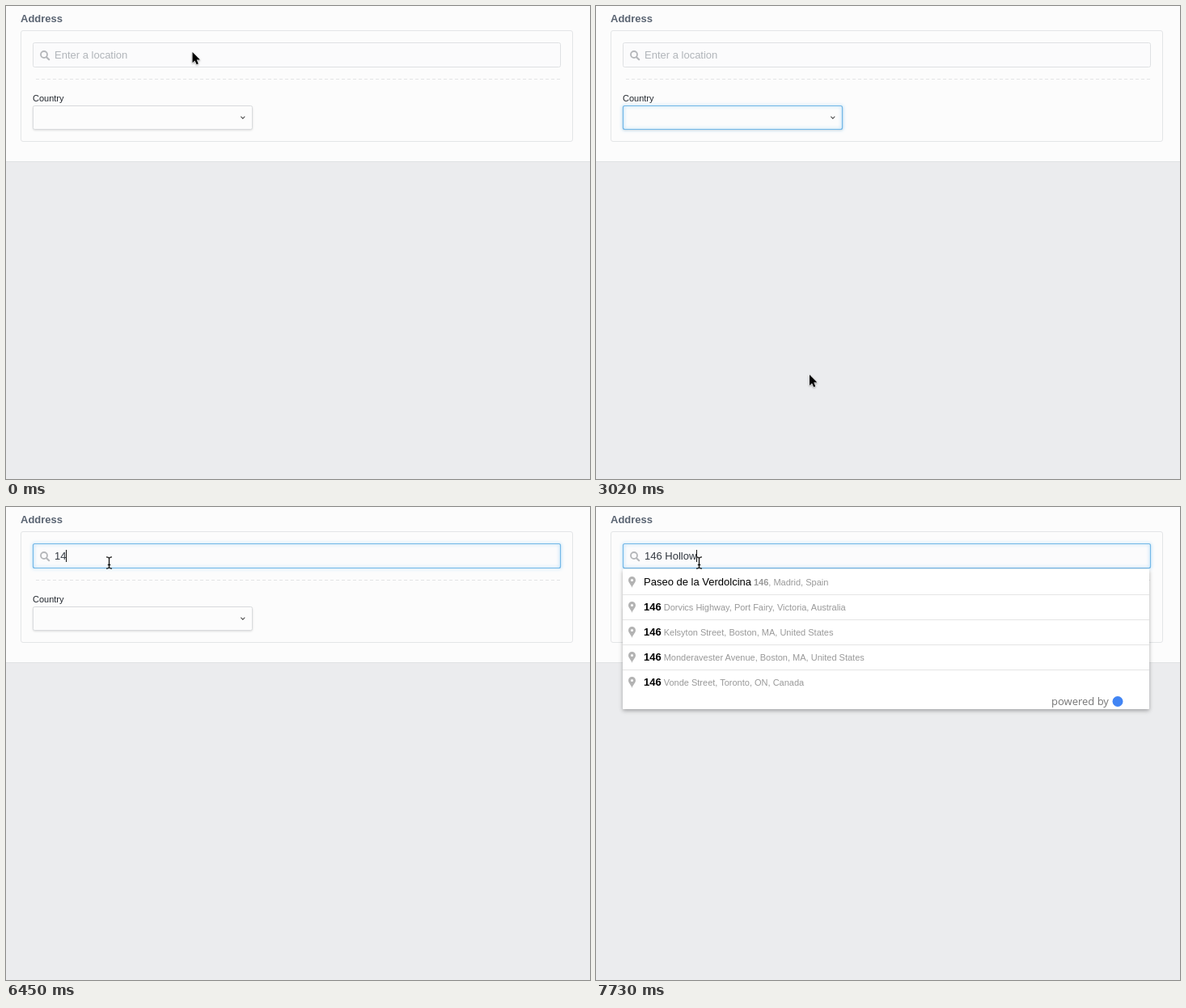
An HTML page that plays this animation: 722 px wide and 585 px high, repeating every 8000 ms.

```html
<!DOCTYPE html>
<html lang="en">
<head>
<meta charset="utf-8">
<title>Address lookup</title>
<style>
  html, body { margin: 0; width: 100%; height: 100%; overflow: hidden; background: #ebecee; }
  svg { display: block; font: 13px "Liberation Sans", Arial, sans-serif; }
  .small { font-size: 11px; }
  .sub { font-size: 11px; fill: #999; }
  .bold { font-weight: 700; }
  .focus { fill: none; stroke: #73b8e8; stroke-width: 1.2; filter: drop-shadow(0 0 2px #7cc4f5); }
  #menu { filter: drop-shadow(0 2px 2.5px rgba(0, 0, 0, .32)); }
  #select { filter: drop-shadow(0 1px 1px rgba(0, 0, 0, .12)); }
  #arrow { filter: drop-shadow(0 1px 1px rgba(0, 0, 0, .35)); }
</style>
</head>
<body>
<svg width="722" height="585" viewBox="0 0 722 585">
  <defs>
    <path id="pin" fill="#b3b3b3" fill-rule="evenodd"
      d="M4.5 14C4 10.5 0 8 0 4.5a4.5 4.5 0 0 1 9 0C9 8 5 10.5 4.5 14ZM4.5 2.9a1.6 1.6 0 1 0 0 3.2a1.6 1.6 0 1 0 0-3.2Z"/>
  </defs>
  <rect width="722" height="585" fill="#ebecee"/>
  <rect width="722" height="192" fill="#fcfcfc"/>
  <path d="M0 192.5H722" stroke="#e0e2e4"/>
  <text class="bold" x="18" y="20" fill="#5a6472">Address</text>
  <rect x="18.5" y="30.5" width="682" height="137" rx="2.5" fill="none" stroke="#e3e5e7"/>
  <path d="M37 90.5H686" stroke="#e3e4e5" stroke-dasharray="4 3"/>

  <rect x="33.5" y="45.5" width="652" height="30" rx="2" fill="#fbfbfc" stroke="#dfe1e3"/>
  <rect id="inputFocus" class="focus" x="33.5" y="45.5" width="652" height="30" rx="2"/>
  <g fill="none" stroke="#b5b7ba">
    <circle cx="47" cy="60" r="4" stroke-width="1.8"/>
    <path d="M50 63.2L53.2 66.2" stroke-width="2.2" stroke-linecap="round"/>
  </g>
  <text id="entry" x="60" y="65"></text>
  <rect id="caret" y="53" width="1" height="15" fill="#111"/>

  <text class="small" x="33" y="118" fill="#22272e">Country</text>
  <rect id="select" x="33.5" y="123.5" width="271" height="29" rx="2" fill="#fcfcfc" stroke="#d9dbdd"/>
  <rect id="selectFocus" class="focus" x="33.5" y="123.5" width="271" height="29" rx="2"/>
  <path d="M290.3 136.7L292.8 139.2L295.3 136.7" fill="none" stroke="#555" stroke-width="1.1"/>

  <g id="menu">
    <rect x="33" y="77" width="651" height="173" rx="1" fill="#fff"/>
    <g id="rows"></g>
    <text x="563" y="245" fill="#757575" font-family="Open Sans, sans-serif">powered by</text>
    <circle cx="645" cy="240.5" r="6.5" fill="#4285f4"/>
  </g>

  <path id="arrow" stroke="#fff" stroke-width="1" paint-order="stroke"
    d="M1 0V13.2L4 10.4L6.2 15.2L8.3 14.2L6.2 9.6H10.4Z"/>
  <g id="beam" fill="none">
    <path stroke="#fff" stroke-width="2.6" opacity=".8" d="M0-6V6"/>
    <path stroke="#111" stroke-width="1.3" d="M-3.5-7.2Q-.6-7.2 0-5.5Q.6-7.2 3.5-7.2M0-5.5V5.5M-3.5 7.2Q-.6 7.2 0 5.5Q.6 7.2 3.5 7.2M-1.7 2.5H1.7"/>
  </g>
</svg>
<script>
const LOOP = 8000;
const $ = id => document.getElementById(id);

// Every track is a list of [start time, value]; each value holds until the next.
const selectGlow = [[0, 0], [190, .5], [290, 1], [3700, .5], [3760, 0]];
const inputGlow = [[0, 0], [3700, .5], [3760, 1]];
const caretShown = [[0, 0], [3760, 1], [4240, 0], [4720, 1], [5200, 0], [5740, 1]];
const typed = [
  [0, ""], [6150, "1"], [6450, "14"], [6800, "146"], [6920, "146 "], [7210, "146 H"],
  [7320, "146 Ho"], [7380, "146 Hol"], [7560, "146 Holl"], [7650, "146 Hollo"], [7730, "146 Hollow"]
];
const pointer = [
  [0, [229.5, 57]], [1130, [231.5, 56]], [1185, [226, 74]], [1240, [205, 125]],
  [1295, [181, 215]], [1350, [173, 325]], [1405, [188, 440]], [1460, [230, 567]], [1520, null],
  [3020, [263, 456]], [3080, [257, 395]], [3130, [235, 295]], [3190, [202, 185]], [3250, [168, 100]],
  [3300, [140, 48]], [3360, [124, 26]], [3420, [118, 21]], [3470, [123, 52]], [3530, [127.5, 69]]
];

// Row: [matched part, rest of main text, matched detail, rest of detail]
const street = "Paseo de la Verdolcina";
const results = [
  [0, null],
  [6570, [
    ["", street, "1", ", Madrid, Spain"],
    ["1", "112", "", "Dorvics Highway, Heathmere, Victoria, Australia"],
    ["1", "520", "", "R.E. 7, Kittrell, NC, United States"],
    ["1", "5000", "", "Dovilin Avenue, Miami Beach, FL, United States"],
    ["1", "0", "", "Renstrolt Street, Enterprise, WV, United States"]
  ]],
  [6860, [
    ["", street, "14", ", Madrid, Spain"],
    ["14", "", "", "Dorvics Highway, Port Fairy, Victoria, Australia"],
    ["14", "", "", "Kelsyton Street, Boston, MA, United States"],
    ["14", "00", "", "Monderavester Avenue, Cambridge, MA, United States"],
    ["14", "", "", "Vonde Street, Toronto, ON, Canada"]
  ]],
  [7270, [
    ["", street, "146", ", Madrid, Spain"],
    ["146", "", "", "Dorvics Highway, Port Fairy, Victoria, Australia"],
    ["146", "", "", "Kelsyton Street, Boston, MA, United States"],
    ["146", "", "", "Monderavester Avenue, Boston, MA, United States"],
    ["146", "", "", "Vonde Street, Toronto, ON, Canada"]
  ]]
];

const at = (track, t) => track.findLast(([start]) => start <= t)[1];
const show = (el, on) => el.setAttribute("visibility", on ? "visible" : "hidden");

function rowMarkup([match, main, subMatch, sub], i) {
  const y = 97 + 31 * i;
  const detail = subMatch
    ? `<tspan class="sub bold" dx="3">${subMatch}</tspan><tspan class="sub">${sub}</tspan>`
    : `<tspan class="sub" dx="3">${sub}</tspan>`;
  const rule = i ? `<path d="M33 ${y - 19.5}H684" stroke="#e5e5e5"/>` : "";
  return `${rule}<use href="#pin" x="40" y="${y - 11}"/>` +
    `<text x="59" y="${y}"><tspan class="bold">${match}</tspan>${main}${detail}</text>`;
}

function drawEntry(t) {
  const text = at(typed, t);
  const entry = $("entry");
  entry.textContent = text.replace(/ /g, "\u00a0") || "Enter a location";
  entry.setAttribute("fill", text ? "#30363e" : "#b1b5ba");
  const width = text ? entry.getComputedTextLength() : 0;
  $("caret").setAttribute("x", Math.floor(60 + width));
  show($("caret"), at(caretShown, t));
}

function drawPointer(t) {
  const spot = at(pointer, t);
  const overInput = spot && spot[1] > 44 && spot[1] < 77 && t >= 1130;
  show($("arrow"), spot && !overInput);
  show($("beam"), overInput);
  if (spot) $(overInput ? "beam" : "arrow").setAttribute("transform", `translate(${spot})`);
}

let shownRows;
function drawMenu(t) {
  const rows = at(results, t);
  if (rows === shownRows) return;
  shownRows = rows;
  show($("menu"), rows);
  $("rows").innerHTML = rows ? rows.map(rowMarkup).join("") : "";
}

function draw(now) {
  const t = now % LOOP;
  $("selectFocus").setAttribute("opacity", at(selectGlow, t));
  $("inputFocus").setAttribute("opacity", at(inputGlow, t));
  drawEntry(t);
  drawMenu(t);
  drawPointer(t);
}

let origin;
function frame(now) {
  origin ??= now;
  draw(Math.max(0, now - origin));
  requestAnimationFrame(frame);
}
show($("menu"), false);
draw(0);
requestAnimationFrame(frame);
</script>
</body>
</html>
```
